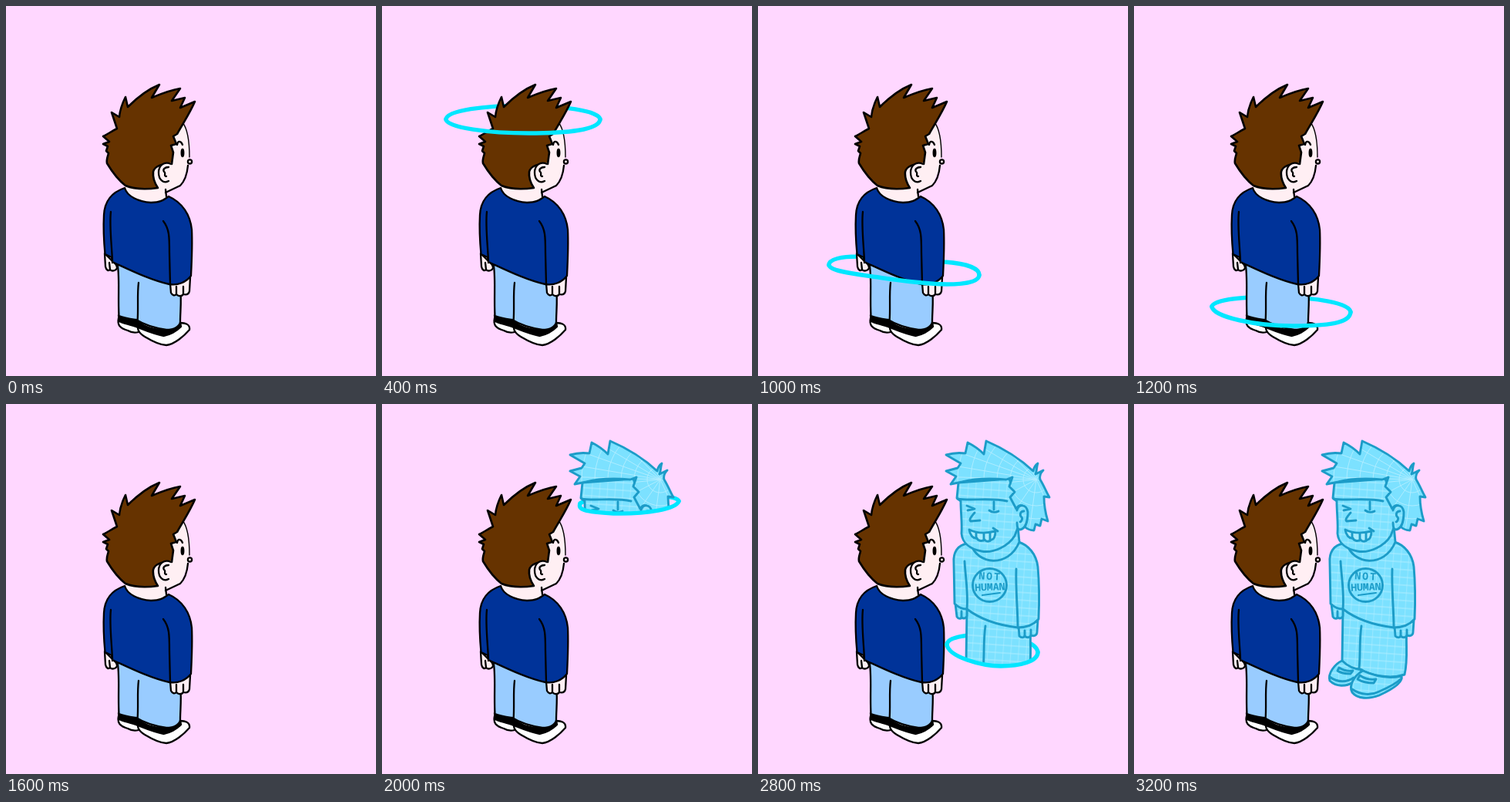
An HTML page without scripts for the animation above (3600 ms loop, 480 px wide and 480 px high).

```html
<!DOCTYPE html>
<html lang="en">
<head>
<meta charset="utf-8">
<title>Scan and copy</title>
<style>
  html, body { margin: 0; width: 100%; height: 100%; overflow: hidden; background: #ffd7ff; }
  svg { display: block; width: 100%; height: 100%; }
  path { stroke-linecap: round; stroke-linejoin: round; }

  /* Each step is visible for one 200 ms slot, chosen by --i */
  .step { visibility: hidden; animation: blink 3.6s step-end infinite; animation-delay: calc(var(--i) * 200ms - 3600ms); }
  .stay { visibility: hidden; animation: stay 3.6s step-end infinite; }
  @keyframes blink { 0% { visibility: visible; } 5.5556%, 100% { visibility: hidden; } }
  @keyframes stay { 0% { visibility: hidden; } 83.3333%, 100% { visibility: visible; } }

  .ring { fill: none; stroke: #00e6ff; stroke-width: 5.4; }
  .man { stroke: #000; stroke-width: 2.3; }
  .skin { fill: #ffeff3; }
  .line { fill: none; }
  .holo { stroke: #1c9cc8; stroke-width: 2.9; fill: url(#grid); }
  .web { fill: none; stroke: #b4eeff; stroke-width: .9; }
  text { font: 700 13px "Noto Sans Mono", "DejaVu Sans Mono", monospace; fill: #1c9cc8; stroke: none; text-anchor: middle; }
</style>
</head>
<body>
<svg viewBox="0 0 480 480">
  <defs>
    <pattern id="grid" width="10" height="10" patternUnits="userSpaceOnUse" patternTransform="rotate(4)">
      <path d="M0 0H10V10H0Z" fill="#7ce1ff" stroke="#b4eeff" stroke-width=".9"/>
    </pattern>

    <path id="mop" d="M250 104L257 94L244 87L259 83L263 77L244 66C254 63 262 63 269 64L272 50C280 54 288 60 293 65L296 48C317 57 340 71 357 87C358 82 360 79 363 77C361 82 362 87 360 91L370 86C366 90 365 94 366 98C371 106 373 112 378 121L371 120C371 130 373 142 376 152L368 149L366 158L360 156L358 164C352 164 347 161 344 157L348 140C346 130 339 129 335 136L327 121L333 114L326 107L330 95L322 98C300 96 280 97 265 101Z"/>
    <clipPath id="mopClip"><use href="#mop"/></clipPath>

    <g id="holo" class="holo">
      <!-- legs and shoes -->
      <path d="M271 266L270 335C278 342 286 344 293 344C306 351 330 358 351 351C356 330 352 310 354 292L336 284Z"/>
      <path class="line" d="M295 288C292 308 294 326 292 343"/>
      <path d="M270 333C261 337 251 349 254 359C262 367 275 367 284 361L296 345C286 344 278 341 270 333Z"/>
      <path d="M297 346C286 352 278 365 283 374C290 383 305 383 318 378C333 371 350 361 347 353C328 357 312 353 297 346Z"/>
      <path class="line" d="M254 354C264 362 277 361 285 355M283 370C295 378 308 378 318 373C332 367 342 361 347 356M266 342C272 346 278 347 284 346L281 350C274 350 268 349 264 346ZM293 352C300 357 308 358 314 357L311 362C303 362 295 360 290 357Z"/>
      <!-- hands -->
      <path d="M256 259L258 276C260 279 263 279 264 277C267 279 270 278 271 275V264Z"/>
      <path d="M338 288L339 301C342 304 345 303 346 301C349 304 353 303 354 300C358 302 362 300 362 296L363 281Z"/>
      <path class="line" d="M264 277V269M346 301V294M354 300V293"/>
      <!-- shirt -->
      <path d="M273 181C258 182 253 194 254 206L255 259C260 264 266 266 271 266C288 279 312 287 337 290C348 290 357 287 364 279C365 256 365 234 363 211C361 195 351 183 338 179Z"/>
      <path class="line" d="M268 204C269 224 273 245 271 266M335 214C334 240 337 266 337 290"/>
      <ellipse cx="300.500" cy="235" rx="22" ry="21.500"/>
      <text x="301" y="228" letter-spacing="2" transform="rotate(3 300 228)">NOT</text>
      <text x="301" y="242" transform="rotate(-2 300 242)">HUMAN</text>
      <path class="line" d="M291 248L314 245" stroke-width="2"/>
      <!-- neck, face -->
      <path d="M276 181C284 209 325 213 339 179L337 158Z"/>
      <path d="M260 102L258 122L263 126C263 142 265 154 264 168C265 180 275 188 290 191C306 194 325 184 333 171L338 158V128L326 97Z"/>
      <path class="line" d="M259 123C275 126 303 121 323 126M271 132L281 136L272 138M306 127V137M300 138C304 141 309 141 312 139M281 141C277 146 273 150 276 152L288 151"/>
      <path fill="#a9edff" d="M274 163C284 168 296 168 308 165C308 171 306 176 303 176C300 179 296 179 294 176C290 179 285 177 284 174C279 175 275 170 274 163Z"/>
      <path class="line" d="M283 174V167M293 177V168M301 177V167M305 161L311 165"/>
      <!-- hair, ear -->
      <use href="#mop" fill="#7ce1ff" stroke="none"/>
      <g class="web" clip-path="url(#mopClip)">
        <circle cx="361" cy="98" r="17"/><circle cx="361" cy="98" r="34"/><circle cx="361" cy="98" r="51"/>
        <circle cx="361" cy="98" r="68"/><circle cx="361" cy="98" r="85"/><circle cx="361" cy="98" r="102"/>
        <path d="M361 98L230 112M361 98L230 94M361 98L230 76M361 98L236 54M361 98L255 35M361 98L285 22M361 98L325 20M361 98L361 20M361 98L390 60M361 98L390 108M361 98L385 150M361 98L352 165M361 98L325 150M361 98L300 130"/>
      </g>
      <use href="#mop" fill="none"/>
      <path d="M336 138C338 130 348 129 350 140C350 152 347 162 340 163C337 163 336 159 336 154"/>
      <path class="line" d="M345 139C340 139 339 144 342 147C344 149 341 153 340 153"/>
    </g>

    <clipPath id="c9"><path d="M236 93C240 106 300 112 330 110S386 104 386 95L480 0H200Z"/></clipPath>
    <clipPath id="c10"><path d="M257 129C254 137 262 140 300 142C345 143 382 136 385 126L480 0H200Z"/></clipPath>
    <clipPath id="c11"><path d="M258 180C254 188 270 195 300 197C340 198 372 194 373 184L480 0H200Z"/></clipPath>
    <clipPath id="c12"><path d="M244 202C246 213 280 231 312 232C345 232 374 222 373 212L480 0H200Z"/></clipPath>
    <clipPath id="c13"><path d="M251 253C250 268 290 282 320 283C350 283 371 275 371 264L480 0H200Z"/></clipPath>
    <clipPath id="c14"><path d="M245 312C247 328 290 340 315 340S363 334 363 322L480 0H200Z"/></clipPath>
  </defs>

  <rect width="480" height="480" fill="#ffd7ff"/>

  <!-- far side of the scan ring -->
  <g class="ring">
    <path class="step" style="--i:1" d="M89 99C92 70 270 70 274 99"/>
    <path class="step" style="--i:2" d="M83 147C86 123 280 124 283 147"/>
    <path class="step" style="--i:3" d="M87 191C88 184 102 181 130 179C170 176 210 182 237 182C258 179 273 180 272 188"/>
    <path class="step" style="--i:4" d="M86 267C90 244 280 246 285 277"/>
    <path class="step" style="--i:5" d="M92 336C92 328 110 325 128 325C170 324 205 328 242 332C270 334 287 340 287 349"/>
    <path class="step" style="--i:6" d="M101 390C104 371 278 373 281 397"/>
    <path class="step" style="--i:7" d="M113 412C116 391 257 393 260 419"/>
  </g>

  <g class="man">
    <!-- shoes -->
    <path fill="#fff" d="M146 405C144 414 148 418 158 421C163 424 168 424 172 423V408Z"/>
    <path fill="#fff" d="M171 411C170 420 172 424 180 429C190 435 200 440 208 440C219 439 232 427 238 420C239 413 233 411 225 411Z"/>
    <path d="M146 401L170 409C182 418 196 421 208 420C218 419 225 416 226 410L227 416C222 421 214 426 205 428C193 426 181 421 171 417C162 413 152 412 147 409Z"/>
    <!-- trousers -->
    <path fill="#99ccff" d="M144 332C148 346 145 376 146.500 402C154 405 162 406 169 407C180 414 195 418 208 420C218 420 225 416 226 410C226 396 228 382 226 362L212 355Z"/>
    <path class="line" d="M172 359C170 374 172 392 170.500 410"/>
    <!-- hands -->
    <path class="skin" d="M128 321L129 338C130 343 133 344 135 342C138 345 143 343 144 340C144 336 141 333 138 331Z"/>
    <path class="skin" d="M213 360L214 372C216 376 219 376 221 374C224 377 228 377 230 374C234 375 237 374 238 370L239 352Z"/>
    <path class="line" d="M135 342L134 333M138 333L142 332M221 374V364M230 374V364"/>
    <!-- neck, face -->
    <path class="skin" stroke="none" d="M154 230C155 248 172 256 190 255C200 254 206 250 209 246L206 241L226 233L235 211L238 190C238 176 235 159 229 151L200 140L160 200Z"/>
    <path class="line" stroke-width="1.400" d="M229 151C236 160 238 178 238 196"/>
    <path class="line" d="M236 207C235 218 231 228 226 233L207 242"/>
    <circle class="skin" cx="238.500" cy="202" r="2.600"/>
    <ellipse cx="229" cy="190.500" rx="1.300" ry="4.600"/>
    <path class="line" d="M222 180C223 174 227 175 229 180M207 238L208 247"/>
    <!-- jumper -->
    <path fill="#003399" d="M154 236C139 241 128 252 127 271C126 290 127 306 128.500 322L137 326L138 332C160 342 188 356 212 361C223 363 234 358 240 350C241 330 242 310 241 290C239 271 229 255 211 247C204 252 200 255 188 255C172 254 157 247 154 236Z"/>
    <path class="line" d="M136 267C134 285 137 308 138 331M204 279C212 289 212 300 212 320L213 361"/>
    <!-- hair, ear -->
    <path fill="#663300" stroke-width="2.600" d="M155 233C146 226 137 214 131 204C130 199 132 195 133 191L130 188L132 182L126 179L134 176L126 169C131 167 136 163 144 159L137 138L147 144C148 133 151 126 155 118L158 131C170 119 184 108 199 102L189 119C203 113 214 109 226 107L215 123L232 119L226 132L245 124C239 138 231 150 222 166L217 169L221 179L214 181L217 190L215 205C204 204 193 207 191 215C190 224 193 230 197 236C182 238 167 238 155 233Z"/>
    <path class="skin" stroke="none" d="M215 204C205 201 197 207 197 217C198 226 204 231 213 227Z"/>
    <path class="line" d="M214 205C205 201 198 207 198 216C198 225 204 231 211 227M211 209C206 209 203 212 205 215C208 216 204 221 208 221"/>
  </g>

  <!-- near side of the scan ring -->
  <g class="ring">
    <path class="step" style="--i:1" d="M89 99C91 112 145 122 185 122S272 116 274 99"/>
    <path class="step" style="--i:2" d="M83 147C84 158 140 165 190 165S282 161 283 147"/>
    <path class="step" style="--i:3" d="M87 191C86 199 108 203 132 205C165 209 212 209 240 208C257 207 271 199 272 188"/>
    <path class="step" style="--i:4" d="M86 267C88 284 150 297 200 297S284 294 285 277"/>
    <path class="step" style="--i:5" d="M92 336C93 343 120 347 142 350C178 355 205 360 245 361C268 361 287 358 287 349"/>
    <path class="step" style="--i:6" d="M101 390C103 404 160 415 205 415S280 412 281 397"/>
    <path class="step" style="--i:7" d="M113 412C115 428 165 440 205 440S259 434 260 419"/>
  </g>

  <!-- copy built from the top down -->
  <g class="ring">
    <path class="step" style="--i:9" d="M236 93C238 79 386 79 386 95"/>
    <path class="step" style="--i:10" d="M257 129C270 118 384 114 385 126"/>
    <path class="step" style="--i:11" d="M258 180C270 169 370 171 373 184"/>
    <path class="step" style="--i:12" d="M244 202C246 198 258 198 300 204S372 208 373 212"/>
    <path class="step" style="--i:13" d="M251 253C252 238 370 243 371 264"/>
    <path class="step" style="--i:14" d="M245 312C247 292 360 296 363 322"/>
    <path class="step" style="--i:15" d="M245 350C247 330 360 334 363 358"/>
  </g>
  <g class="step" style="--i:9" clip-path="url(#c9)"><use href="#holo"/></g>
  <g class="step" style="--i:10" clip-path="url(#c10)"><use href="#holo"/></g>
  <g class="step" style="--i:11" clip-path="url(#c11)"><use href="#holo"/></g>
  <g class="step" style="--i:12" clip-path="url(#c12)"><use href="#holo"/></g>
  <g class="step" style="--i:13" clip-path="url(#c13)"><use href="#holo"/></g>
  <g class="step" style="--i:14" clip-path="url(#c14)"><use href="#holo"/></g>
  <g class="stay"><use href="#holo"/></g>
  <g class="ring">
    <path class="step" style="--i:9" d="M236 93C240 106 300 112 330 110S386 104 386 95"/>
    <path class="step" style="--i:10" d="M257 129C254 137 262 140 300 142C345 143 382 136 385 126"/>
    <path class="step" style="--i:11" d="M258 180C254 188 270 195 300 197C340 198 372 194 373 184"/>
    <path class="step" style="--i:12" d="M244 202C246 213 280 231 312 232C345 232 374 222 373 212"/>
    <path class="step" style="--i:13" d="M251 253C250 268 290 282 320 283C350 283 371 275 371 264"/>
    <path class="step" style="--i:14" d="M245 312C247 328 290 340 315 340S363 334 363 322"/>
    <path class="step" style="--i:15" d="M245 350C247 366 285 378 310 378S363 370 363 358"/>
  </g>
</svg>
</body>
</html>
```
